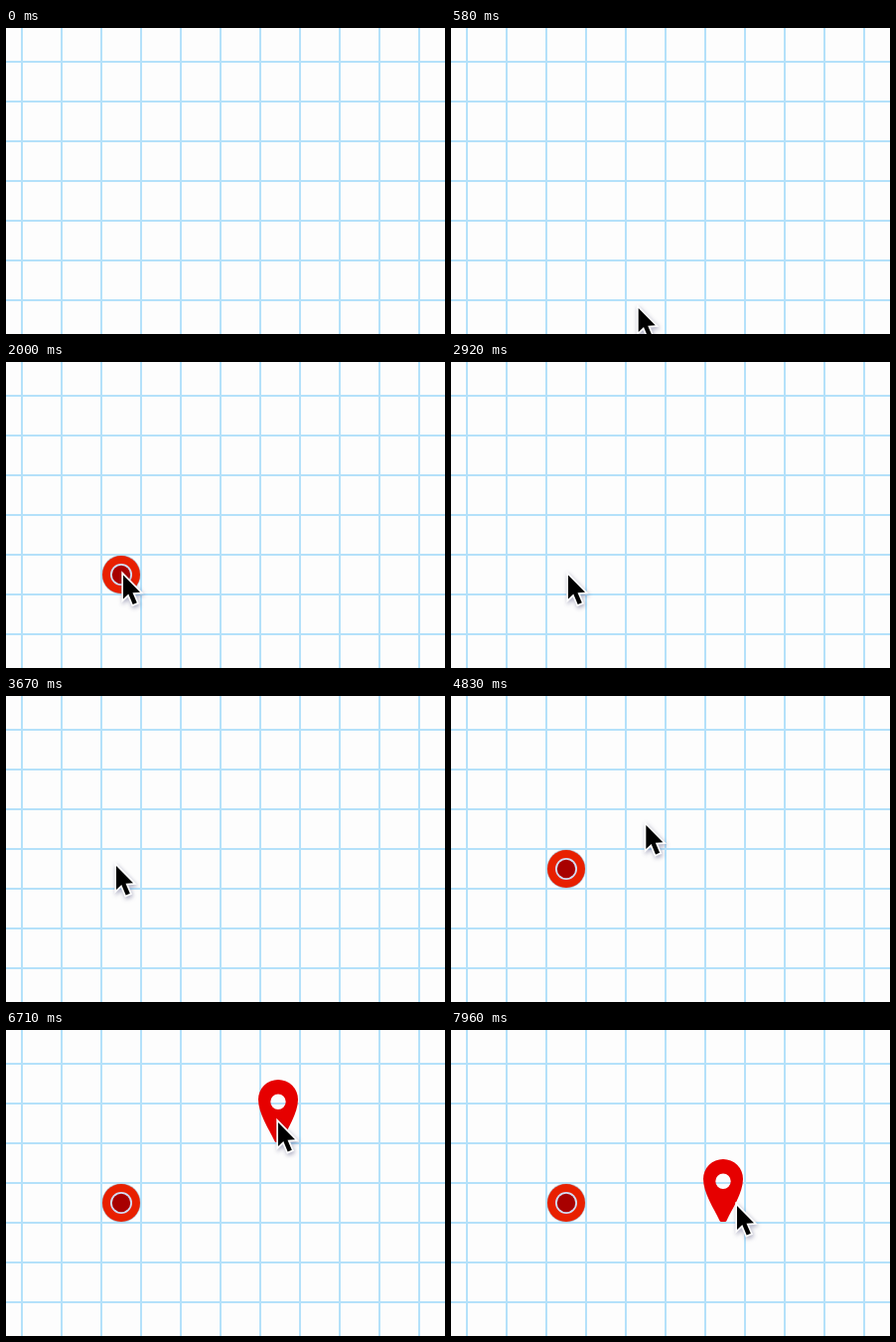
Write an HTML page with a canvas that moves like this. It is 442 by 308 pixels and loops after 8 s.

```html
<!DOCTYPE html>
<html lang="en">
<head>
<meta charset="utf-8">
<title>Grid markers</title>
<style>
  html, body { margin: 0; width: 100%; height: 100%; overflow: hidden; background: #fdfdfd; }
  canvas { display: block; width: 442px; height: 308px; }
</style>
</head>
<body>
<canvas id="stage" width="442" height="308"></canvas>
<script>
const W = 442, H = 308, LOOP = 8000;
const ctx = document.getElementById('stage').getContext('2d');

// Pointer path: time, x, y of the arrow tip
const path = [
  [360, 214, 312], [920, 140, 224], [1400, 118, 214.5], [2960, 118, 214.5],
  [3560, 111, 171], [4240, 111, 171], [5360, 269, 95], [5540, 269, 95],
  [5720, 274, 93], [7060, 274, 93], [7640, 288, 177], [8000, 288, 177]
];

// Markers appear and vanish at once: start, end, drawing, x, y
const markers = [
  [1600, 2840, drawTarget, 116, 214],
  [3960, LOOP, drawTarget, 116, 174],
  [5860, 6960, drawPin, 274, 50],
  [7740, LOOP, drawPin, 274, 130]
];

const ease = p => p * p * (3 - 2 * p);

function pointerAt(t) {
  if (t < path[0][0]) return null;
  const i = path.findIndex(k => k[0] > t);
  const [t0, x0, y0] = path[i - 1];
  const [t1, x1, y1] = path[i];
  const p = ease((t - t0) / (t1 - t0));
  return [x0 + (x1 - x0) * p, y0 + (y1 - y0) * p];
}

function drawGrid() {
  ctx.fillStyle = '#fdfdfd';
  ctx.fillRect(0, 0, W, H);
  ctx.fillStyle = '#b4e1fa';
  for (let x = 15; x < W; x += 40) ctx.fillRect(x, 0, 2, H);
  for (let y = 33; y < H; y += 40) ctx.fillRect(0, y, W, 2);
}

function disc(x, y, r, color) {
  ctx.fillStyle = color;
  ctx.beginPath();
  ctx.arc(x, y, r, 0, Math.PI * 2);
  ctx.fill();
}

function drawTarget(x, y) {
  disc(x, y, 19.7, '#b4c8d8');
  disc(x, y, 19, '#e82000');
  disc(x, y, 11, '#d2def6');
  disc(x, y, 9.2, '#a80000');
}

function drawPin(x, top) {
  ctx.save();
  ctx.translate(x, top);
  ctx.fillStyle = '#e60000';
  ctx.beginPath();
  ctx.arc(0, 20, 20, Math.PI, 0);
  ctx.bezierCurveTo(20, 34, 9, 50, 3.5, 62);
  ctx.quadraticCurveTo(3, 63, 2, 63);
  ctx.lineTo(-2, 63);
  ctx.quadraticCurveTo(-3, 63, -3.5, 62);
  ctx.bezierCurveTo(-9, 50, -20, 34, -20, 20);
  // The hole lets the grid show through
  ctx.moveTo(7.7, 22.3);
  ctx.arc(0, 22.3, 7.7, 0, Math.PI * 2);
  ctx.fill('evenodd');
  ctx.restore();
}

const arrow = new Path2D('M0 0V24L5.3 19L9.7 29.5L13.8 27.8L9.5 17.8L17 17.3Z');

function drawPointer(x, y) {
  ctx.save();
  ctx.translate(x, y);
  ctx.lineJoin = 'miter';
  ctx.lineWidth = 3.4;
  ctx.strokeStyle = '#fdfdfd';
  ctx.shadowColor = 'rgba(70, 70, 120, 0.45)';
  ctx.shadowBlur = 4;
  ctx.shadowOffsetX = 1;
  ctx.shadowOffsetY = 2;
  ctx.stroke(arrow);
  ctx.shadowColor = 'transparent';
  ctx.fillStyle = '#000';
  ctx.fill(arrow);
  ctx.restore();
}

function draw(t) {
  drawGrid();
  for (const [from, to, paint, x, y] of markers) {
    if (t >= from && t < to) paint(x, y);
  }
  const tip = pointerAt(t);
  if (tip) drawPointer(...tip);
}

let start;
function tick(now) {
  start ??= now;
  draw(Math.max(0, now - start) % LOOP);
  requestAnimationFrame(tick);
}
draw(0);
requestAnimationFrame(tick);
</script>
</body>
</html>
```
